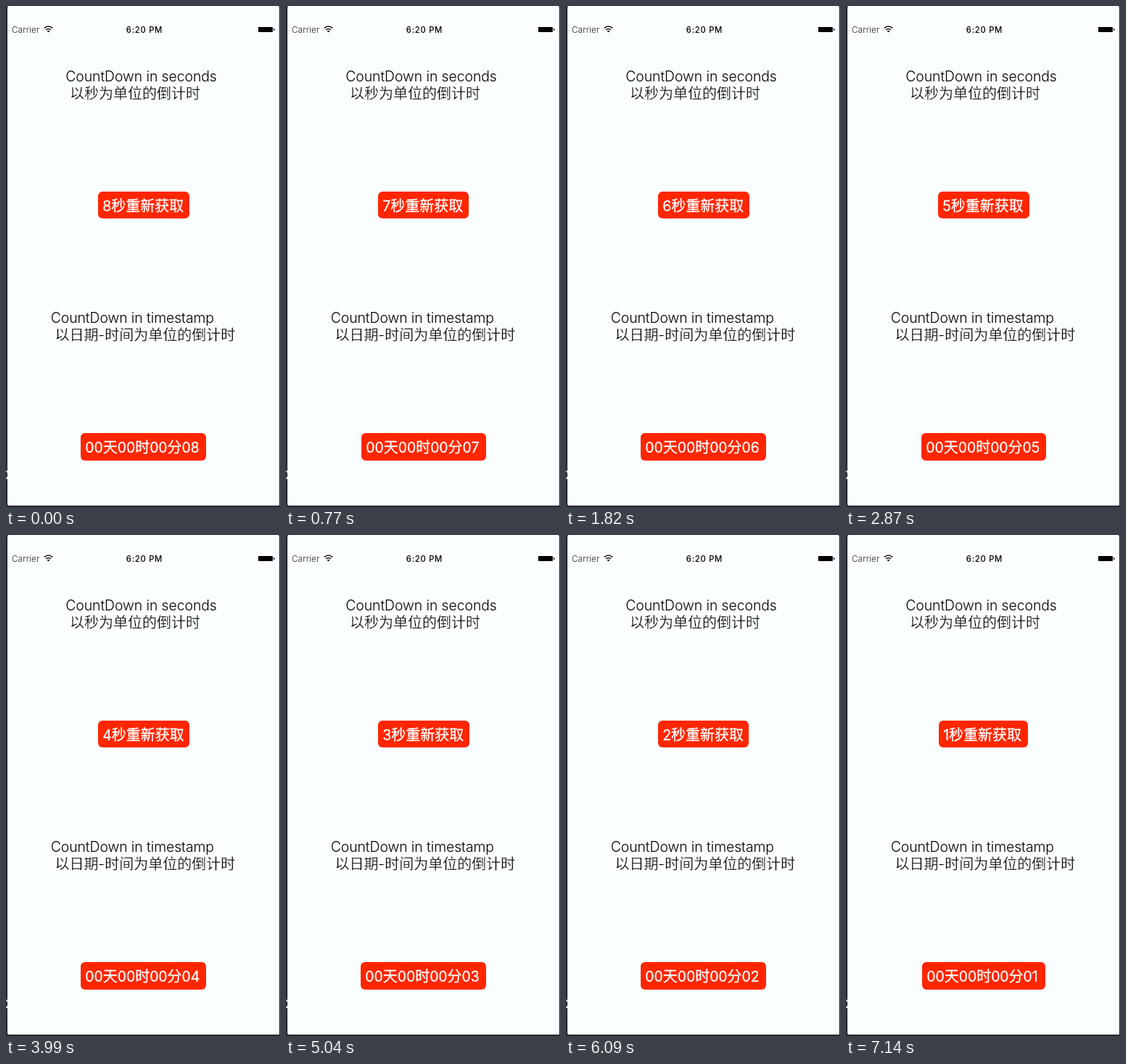
Recreate the animation shown at these times as an HTML page. Size 378 by 691 pixels, loop 8 s.

```html
<!DOCTYPE html>
<html lang="zh-CN">
<head>
<meta charset="utf-8">
<title>CountDown</title>
<style>
  html, body { margin: 0; width: 100%; height: 100%; overflow: hidden; background: #2b2b37; }
  svg { display: block; width: 378px; height: 691px; }
  text { font-family: Inter, "Noto Sans CJK SC", sans-serif; white-space: pre; }
  .latin { font-size: 19.4px; font-weight: 300; letter-spacing: -.08px; }
  .han { font-family: "Noto Sans CJK SC", "Noto Sans CJK", sans-serif; font-size: 20px; }
  .thin { stroke: #fafeff; stroke-width: .3px; }
  .label { fill: #fff; stroke: #fff; stroke-width: .3px; }
  .num { font-size: 19.4px; }
</style>
</head>
<body>
<svg viewBox="0 0 378 691">
  <rect width="378" height="691" fill="#2b2b37"/>
  <path d="M4 0H375Q377 0 377 2V689H4Q2 689 2 687V2Q2 0 4 0Z" fill="#fafeff"/>
  <path d="M0 642Q2 641 2.5 644M0 651.5Q2 652 2.5 649" fill="none" stroke="#fff" stroke-width="1.6"/>

  <text x="8" y="36.5" font-size="11.5" font-weight="300" letter-spacing=".25" fill="#222">Carrier</text>
  <g fill="none" stroke="#111" stroke-width="1.5">
    <path d="M52.8 30.6Q58.5 25.4 64.2 30.6M55 33Q58.5 29.9 62 33"/>
    <path d="M56.7 34.6Q58.5 33 60.3 34.6L58.5 36.6Z" fill="#111" stroke="none"/>
  </g>
  <text x="191" y="36.5" font-size="11.3" font-weight="500" letter-spacing=".7" text-anchor="middle">6:20 PM</text>
  <rect x="348" y="29" width="20" height="7" rx="1"/>
  <rect x="369" y="31" width="1.5" height="3" rx=".7"/>

  <text class="latin" x="82.3" y="103.5">CountDown in seconds</text>
  <text class="han thin" x="88" y="127.5">以秒为单位的倒计时</text>
  <text class="latin" x="61.7" y="437">CountDown in timestamp</text>
  <text class="han thin" x="67.5" y="461">以日期</text>
  <text class="latin" x="127.2" y="461">-</text>
  <text class="han thin" x="136.3" y="461">时间为单位的倒计时</text>

  <g id="seconds"></g>
  <g id="stamp"></g>
</svg>
<script>
const LOOP = 8000, MID = 189.75;
// start time, digit, width of upper button, width of lower button
const STEPS = [
  [0, 8, 126, 173], [770, 7, 125, 172], [1820, 6, 126, 173], [2870, 5, 126, 172],
  [3990, 4, 126, 173], [5040, 3, 126, 173], [6090, 2, 125, 173], [7140, 1, 123, 170]
];
const num = s => `<tspan class="num">${s}</tspan>`;
const han = s => `<tspan class="han">${s}</tspan>`;

function button(id, y, h, width, label) {
  const x = Math.round(MID - width / 2);
  document.getElementById(id).innerHTML =
    `<rect x="${x}" y="${y}" width="${width}" height="${h}" rx="6" fill="#ff2600"/>` +
    `<text class="label" x="${x + 6.2}" y="${y + 26.5}">${label}</text>`;
}

let shown;
function draw() {
  const t = performance.now() % LOOP;
  const step = STEPS.filter(s => s[0] <= t).pop();
  if (step !== shown) {
    shown = step;
    const [, n, upper, lower] = step;
    button("seconds", 256, 37, upper, num(n) + han("秒重新获取"));
    button("stamp", 589, 38, lower,
      num("00") + han("天") + num("00") + han("时") + num("00") + han("分") + num("0" + n));
  }
  requestAnimationFrame(draw);
}
draw();
</script>
</body>
</html>
```
